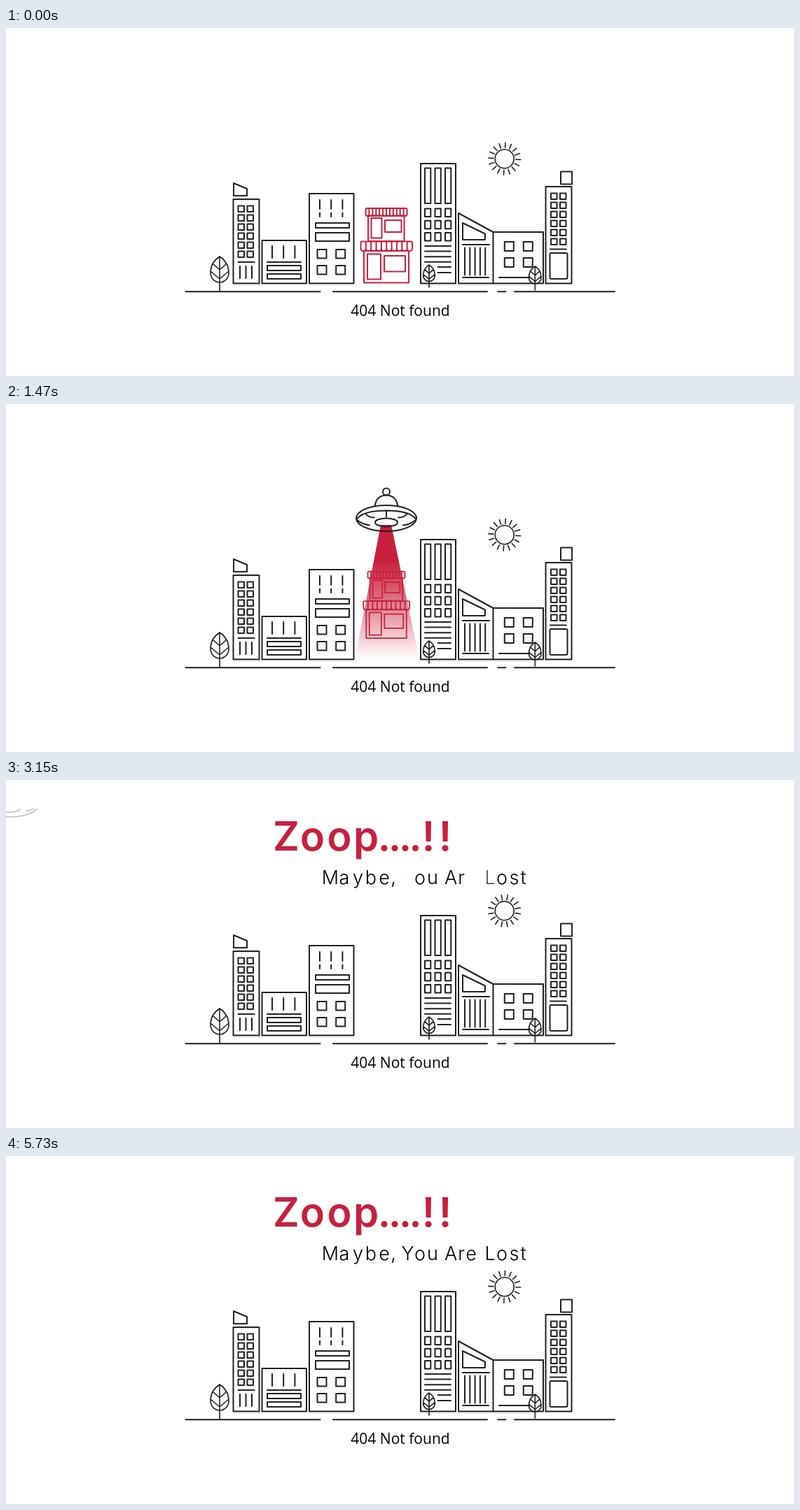
Animation, 1125 px wide and 498 px high, one loop 5.76 s. Source, as an HTML page:

```html
<!DOCTYPE html>
<html lang="en">
<head>
<meta charset="utf-8">
<title>404 Not found</title>
<style>
  html, body { margin: 0; width: 100%; height: 100%; overflow: hidden; background: #fff; }
  svg { display: block; width: 100vw; height: 100vh; }
  .line { fill: none; stroke: #231f20; stroke-width: 2; stroke-linecap: round; stroke-linejoin: round; }
  .thin { stroke-width: 1.6; }
  .red { stroke: #c8203c; }
  text { text-anchor: middle; }
  .title { font: 600 58px Inter, sans-serif; fill: #c8203c; }
  .subtitle { font: 300 27px Inter, sans-serif; }
  .caption { font: 21px "Open Sans", "Noto Sans", sans-serif; }
</style>
</head>
<body>
<svg viewBox="0 0 1125 498">
  <defs>
    <linearGradient id="glow" gradientUnits="userSpaceOnUse" x1="0" y1="173" x2="0" y2="365">
      <stop offset=".27" stop-color="#c8203c"/>
      <stop offset=".5" stop-color="#c8203c" stop-opacity=".7"/>
      <stop offset="1" stop-color="#c8203c" stop-opacity="0"/>
    </linearGradient>
    <clipPath id="sky"><path d="M0 41H1123V498H0z"/></clipPath>
    <path id="tree" vector-effect="non-scaling-stroke" d="M0 0C-9 6-13 15-13 23C-13 32-6 37 0 37S13 32 13 23C13 15 9 6 0 0V50M-9 11L0 19L9 11M-12 22L0 32L12 22"/>
  </defs>

  <path id="city" class="line"/>
  <g class="line thin">
    <use href="#tree" x="0" transform="translate(305 327)"/>
    <use href="#tree" transform="translate(604 339) scale(.64)"/>
    <use href="#tree" transform="translate(755.3 341) scale(.68)"/>
  </g>
  <g class="line thin" id="sun">
    <circle r="13.5"/>
    <path id="rays"/>
  </g>

  <path id="shop" class="line red"/>
  <path id="beam" fill="url(#glow)" d="M535 173H550L590 365H498z"/>
  <g clip-path="url(#sky)">
    <g class="line" id="saucer">
      <circle cy="-38" r="5"/>
      <ellipse rx="43" ry="18.5"/>
      <ellipse cy="6" rx="16" ry="6"/>
      <path d="M-16-17C-16-27-9-33 0-33S16-27 16-17M-42 1C-36-7-20-11 0-11S36-7 42 1M0-10V-2
        M-30-7Q-26-1-17-1M30-7Q26-1 17-1M-41 3Q-34 9-24 10M41 3Q34 9 24 10"/>
    </g>
  </g>

  <g id="words"></g>
  <text class="caption" x="563" y="412">404 Not found</text>
</svg>
<script>
const LOOP = 5760;
const el = id => document.getElementById(id);
const place = (id, transform) => el(id).setAttribute('transform', transform);
const fade = (node, a) => node.setAttribute('opacity', a);

// Path builders: a grid of boxes, rows of vertical strokes, stacks of horizontal ones
const repeat = (n, f) => Array.from({ length: n }, (_, i) => f(i)).join('');
const boxes = (x, y, w, h, cols = 1, dx = 0, rows = 1, dy = 0) =>
  repeat(rows, r => repeat(cols, c => `M${x + c * dx} ${y + r * dy}h${w}v${h}h${-w}z`));
const uprights = (x, y, h, n, dx) => repeat(n, i => `M${x + i * dx} ${y}v${h}`);
const levels = (x, y, w, n = 1, dy = 0) => repeat(n, i => `M${x} ${y + i * dy}h${w}`);
const awning = (x, y, w, h, n) => {
  const s = w / n, r = s / 2;
  return `M${x} ${y + h}V${y + 2}q0-2 2-2h${w - 4}q2 0 2 2V${y + h}` +
    repeat(n, i => `M${x + i * s} ${y + h}a${r} ${r} 0 0 0 ${s} 0`) +
    uprights(x + s, y, h, n - 1, s);
};

el('city').setAttribute('d', [
  // left tower
  'M325 222L344 230V240H325z', boxes(324.5, 245, 37, 120.5),
  boxes(331.5, 254.5, 8.5, 8.5, 2, 13, 6, 13), levels(331.5, 335, 23), uprights(334, 341, 17, 3, 8.5),
  // low block
  boxes(365.5, 304, 63.5, 61.5), uprights(380, 312, 17, 3, 16.2), levels(373, 335, 48),
  boxes(373, 340, 48, 7, 1, 0, 2, 12),
  // wide block
  boxes(433, 237, 63.5, 128.5), uprights(448, 246, 13, 3, 16.2), uprights(448, 264.5, 5.5, 3, 16.2),
  boxes(442, 279, 48, 7), boxes(442, 293, 48, 12), boxes(444.5, 317, 13, 12.5, 2, 26.7, 2, 23),
  // skyscraper
  boxes(592, 194, 50, 171.5), boxes(598, 200.5, 8.3, 50.5, 3, 14.5),
  boxes(598, 258.5, 8.3, 11.5, 3, 14.5, 3, 17.3), levels(598, 312, 37, 4, 7.6), levels(616.5, 342, 18.5, 2, 8),
  // slanted block
  'M646 265L695.5 292V365.5H646zM652 279L684 294.5V303H652z',
  levels(652, 310, 38), uprights(655, 314.5, 39, 5, 7.3), levels(652, 357, 37),
  // square block
  boxes(695.5, 292, 71.5, 73.5), boxes(711.8, 306, 13, 13, 2, 27, 2, 23), levels(704, 357, 44),
  // right tower
  boxes(792, 205.5, 16, 18), boxes(770.5, 227, 37, 138.5), boxes(778, 236.5, 8.5, 8.5, 2, 13, 6, 13),
  levels(777, 316.5, 23), 'M778.5 322h21q2 0 2 2v33q0 2-2 2h-21q-2 0-2-2v-33q0-2 2-2z',
  // ground
  levels(256.5, 377.3, 192), levels(467, 377.3, 220), levels(702.5, 377.3, 11), levels(726, 377.3, 143)
].join(''));

el('shop').setAttribute('d', [
  awning(513.5, 258, 59, 8.5, 12), boxes(517, 269, 51.5, 36), boxes(521.5, 272, 15, 28.5), boxes(541, 275, 23.5, 17),
  awning(506.5, 305.5, 73.5, 10, 10), boxes(511, 319, 64, 45.5), boxes(516, 323.5, 19, 36), boxes(540, 326, 30, 22.5)
].join(''));

el('rays').setAttribute('d', repeat(16, i => {
  const a = i * Math.PI / 8, x = Math.sin(a), y = -Math.cos(a);
  return `M${x * 16} ${y * 16}L${x * 23} ${y * 23}`;
}));

// One text element per letter; each fades in at its own moment
function letters(cls, string, y, centers, startOf) {
  return [...string].map((char, i) => {
    const node = document.createElementNS('http://www.w3.org/2000/svg', 'text');
    node.setAttribute('class', cls);
    node.setAttribute('x', centers[i]);
    node.setAttribute('y', y);
    node.textContent = char;
    el('words').append(node);
    return { node, start: startOf(i) };
  });
}
const order = [4, 9, 1, 7, 11, 2, 15, 5, 10, 0, 8, 16, 13, 3, 12, 6];
const words = [
  ...letters('title', 'Zoop....!!', 101, [400, 437.5, 476, 514, 540, 555, 570, 584.5, 603, 627], i => 2580 + i * 7 % 10 * 30),
  ...letters('subtitle', 'Maybe,YouAreLost', 149,
    [463, 483, 502.5, 521, 540, 553, 573.5, 591, 609, 635, 650, 664, 691, 708, 725.5, 738.5], i => 2610 + order[i] * 36)
];

const ramp = (t, a, b) => Math.min(1, Math.max(0, (t - a) / (b - a)));
const smooth = u => u * u * (3 - 2 * u);

// Saucer flight: time, x, y
const flight = [
  [0, 1165, 28], [300, 890, 92], [570, 737.5, 105], [600, 724.5, 105.5], [1100, 543, 163.5],
  [2200, 543, 163.5], [2400, 468, 153], [2550, 352.5, 108], [3000, 64, 46], [3250, -8, 32]
];

// Monotone cubic through the flight points, standing still at ends and holds
function follow(t, axis) {
  const slope = i => {
    const [p, q, r] = [flight[i - 1], flight[i], flight[i + 1]];
    if (!p || !r || (q[axis] - p[axis]) * (r[axis] - q[axis]) <= 0) return 0;
    return (r[axis] - p[axis]) / (r[0] - p[0]);
  };
  let i = 0;
  while (i < flight.length - 2 && t > flight[i + 1][0]) i++;
  const [a, b] = [flight[i], flight[i + 1]];
  const span = b[0] - a[0], u = ramp(t, a[0], b[0]), s = smooth(u);
  return a[axis] * (1 - s) + b[axis] * s +
    span * u * (1 - u) * (slope(i) * (1 - u) - slope(i + 1) * u);
}

function draw(t) {
  place('sun', `translate(711.7 187.2) rotate(${3 + 180 * t / LOOP})`);

  place('saucer', `translate(${follow(t, 1)} ${follow(t, 2)})`);
  fade(el('saucer'), ramp(t, 0, 250) * (1 - ramp(t, 2850, 3250)));

  const lift = smooth(ramp(t, 1230, 2080));
  place('shop', `translate(543 ${311 - 122 * lift}) scale(${1 - .52 * lift}) translate(-543 -311)`);
  fade(el('shop'), 1 - ramp(t, 1950, 2080));
  fade(el('beam'), ramp(t, 1080, 1320) * (1 - ramp(t, 2030, 2220)));

  for (const { node, start } of words) fade(node, ramp(t, start, start + 110));
}

const begin = performance.now();
function tick() {
  draw((performance.now() - begin) % LOOP);
  requestAnimationFrame(tick);
}
tick();
</script>
</body>
</html>
```
